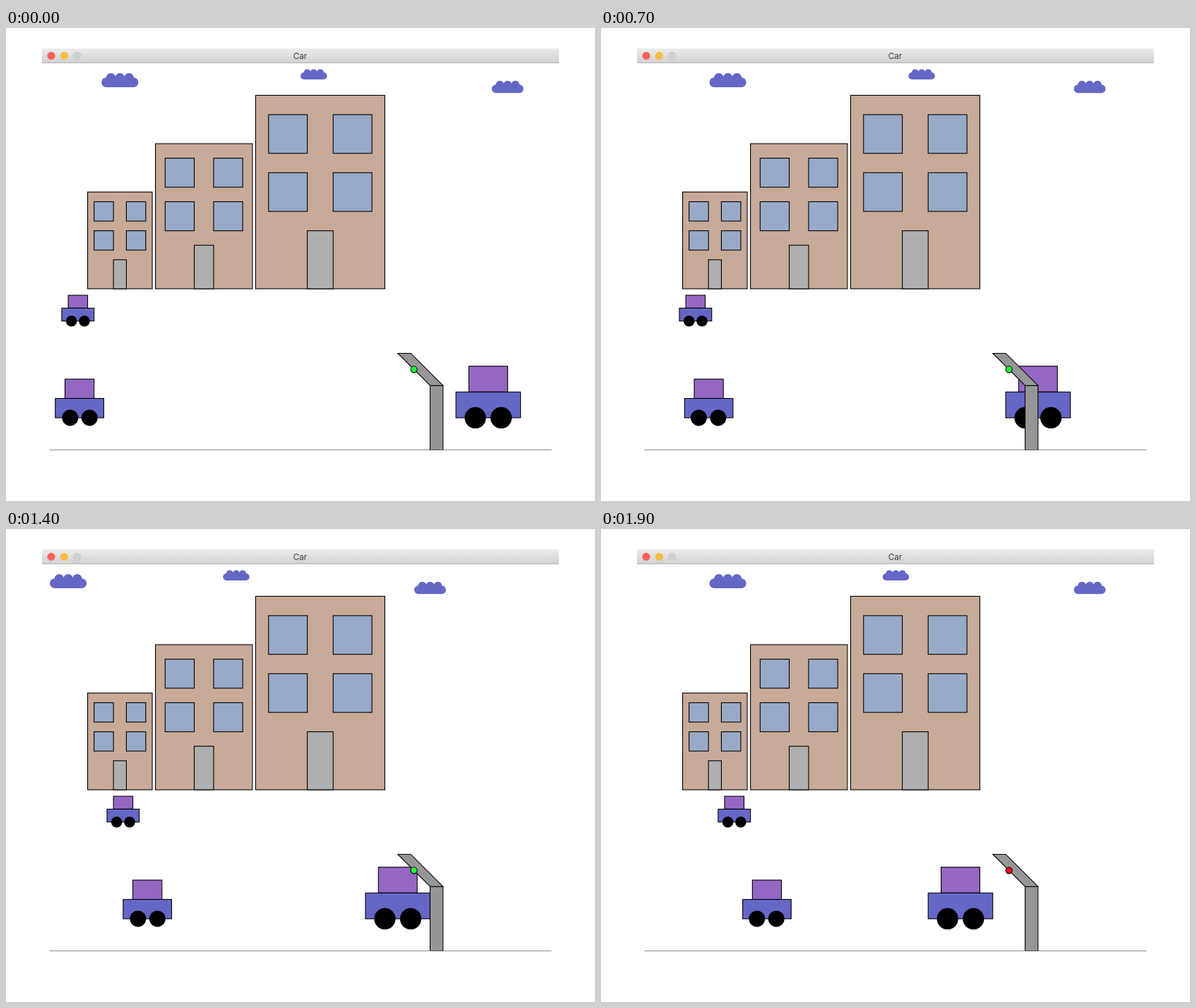
An HTML page with a canvas that plays this animation: 834x671 px, repeating every 2.2 s.

```html
<!DOCTYPE html>
<html lang="en">
<head>
<meta charset="utf-8">
<title>Car</title>
<style>
  html, body { margin: 0; width: 100%; height: 100%; overflow: hidden; background: #fff; }
  canvas { display: block; }
</style>
</head>
<body>
<canvas id="stage" width="834" height="671"></canvas>
<script>
const ctx = document.getElementById('stage').getContext('2d');
const LOOP = 2200, STEP = 100, LAST_STEP = 19;
const BLUE = '#6467c5', PURPLE = '#9567c4', BRICK = '#c7aa97', GLASS = '#98aac7',
      DOOR = '#afafaf', POLE = '#969696';

function box(x, y, w, h, fill) {
  ctx.fillStyle = fill;
  ctx.fillRect(x, y, w, h);
  ctx.strokeRect(x, y, w, h);
}

function disc(x, y, r, fill) {
  ctx.beginPath();
  ctx.arc(x, y, r, 0, 2 * Math.PI);
  ctx.fillStyle = fill;
  ctx.fill();
}

function building(x, w) {
  const h = 1.5 * w, top = 350 - h;
  box(x, top, w, h, BRICK);
  for (const fx of [.1, .6])
    for (const fy of [.1, .4])
      box(x + fx * w, top + fy * h, .3 * w, .2 * h, GLASS);
  box(x + .4 * w, top + .7 * h, .2 * w, .3 * h, DOOR);
}

// The scene places cars on whole units.
function car(x, axleY, w) {
  const at = f => Math.round(x + f * w);
  box(at(.2), axleY - .8 * w, .6 * w, .4 * w, PURPLE);
  box(at(0), axleY - .4 * w, w, .4 * w, BLUE);
  for (const f of [.3, .7]) disc(at(f), axleY, Math.round(w / 3) / 2, '#000');
}

function cloud(x, y, d) {
  const r = d / 2 + .5;
  for (const i of [-1, 0, 1]) disc(x + i * d, y - d / 2, r, BLUE);
  ctx.beginPath();
  ctx.roundRect(x - 2 * d - .5, y - r, 4 * d + 1, 2 * r, r);
  ctx.fill();
}

// Drifts right until step `turn`, then left for `span` steps, then right again.
const drift = (n, min, span, turn) => min + 20 * Math.abs(span - Math.abs(n - turn));

function streetLight(color) {
  box(600, 500, 20, 100, POLE);
  ctx.beginPath();
  ctx.moveTo(600, 500);
  ctx.lineTo(550, 450);
  ctx.lineTo(570, 450);
  ctx.lineTo(620, 500);
  ctx.closePath();
  ctx.fillStyle = POLE;
  ctx.fill();
  ctx.stroke();
  disc(575, 475, 5, color);
  ctx.stroke();
}

function titleBar() {
  const shade = ctx.createLinearGradient(0, 29, 0, 49);
  shade.addColorStop(0, '#ebebeb');
  shade.addColorStop(1, '#d2d2d2');
  ctx.fillStyle = shade;
  ctx.fillRect(51, 29, 732, 20);
  ctx.fillStyle = '#b4b4b4';
  ctx.fillRect(51, 49, 732, 1);
  disc(64, 39.4, 5.6, '#fc605b');
  disc(82.3, 39.4, 5.6, '#f6be40');
  disc(100.5, 39.4, 5.6, '#c3c3c3');
  disc(100.5, 39.4, 5, '#d0d0d0');
  ctx.font = '11.6px Inter, Roboto, sans-serif';
  ctx.textAlign = 'center';
  ctx.fillStyle = '#3c3c3c';
  ctx.fillText('Car', 416.5, 44);
}

function draw(n) {
  ctx.clearRect(0, 0, 834, 671);
  titleBar();
  ctx.fillStyle = '#8c8c8c';
  ctx.fillRect(61.5, 598, 711, 1);

  ctx.save();
  ctx.beginPath();
  ctx.rect(51, 50, 732, 548.5);
  ctx.clip();
  ctx.translate(51.5, 49.7);
  ctx.scale(.915, .915);
  ctx.lineWidth = 1.2;
  ctx.strokeStyle = '#000';

  cloud(drift(n, 20, 9, 4), 30, 14);
  cloud(drift(n, 300, 10, 4), 20, 10);
  cloud(drift(n, 580, 10, 3), 40, 12);
  building(70, 100);
  building(175, 150);
  building(330, 200);
  car(30 + 5 * n, 400, 50);
  car(20 + 7.5 * n, 550, 75);
  const bigX = 640 - 10 * n;
  car(bigX, 550, 100);
  streetLight(bigX + 100 > 550 ? '#21fb34' : '#fb0d1b');
  ctx.restore();
}

const start = performance.now();
function tick() {
  const t = (performance.now() - start) % LOOP;
  draw(Math.min(Math.floor(t / STEP), LAST_STEP));
  requestAnimationFrame(tick);
}
tick();
</script>
</body>
</html>
```
